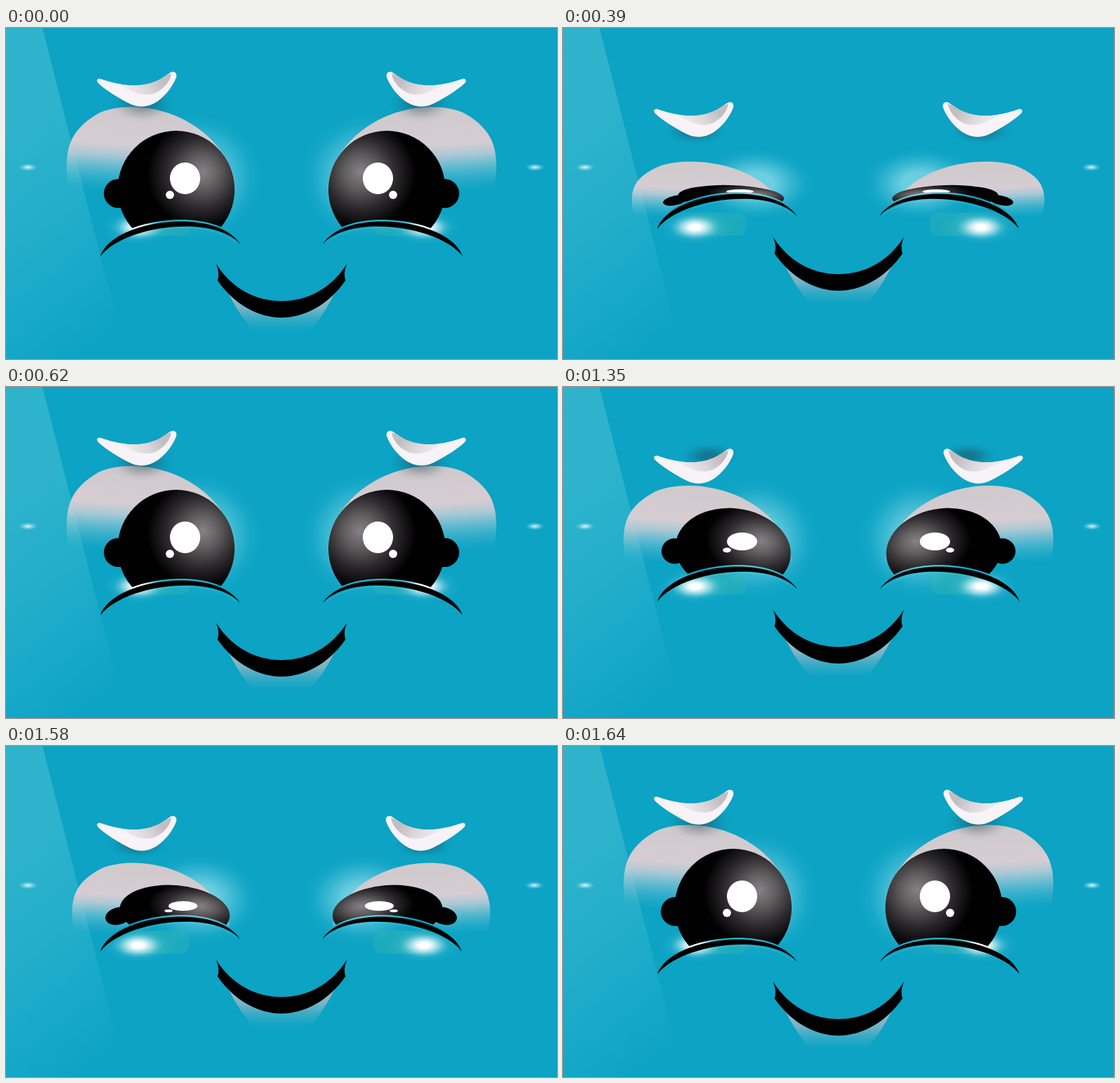
Write an HTML page with a canvas that moves like this. It is 800 by 480 pixels and loops after 2270 ms.

```html
<!DOCTYPE html>
<html lang="en">
<head>
<meta charset="utf-8">
<title>Blinking face</title>
<style>
html, body { margin: 0; width: 100%; height: 100%; overflow: hidden; background: #0ca3c4; }
canvas { display: block; width: 800px; height: 480px; }
</style>
</head>
<body>
<canvas id="c" width="800" height="480"></canvas>
<script>
const ctx = document.getElementById('c').getContext('2d');
const LOOP = 2270;

// eye, ear, shine, spot: [x, y, rx, ry]; white: [left, top, right, height]
const OPEN = {
  brow: 0, lid: 0, mouth: 0, skew: 0, tilt: 0, earTilt: 0,
  white: [88, 115, 334, 120], eye: [247, 234, 85, 85], ear: [163, 240, 21, 21],
  shine: [260, 218, 22, 23], spot: [238, 242, 6, 6],
  glow: [280, 216, 92, 92], shade: [198, 110, 48, 27, 0.42]
};
const HALF = {
  brow: 26, lid: -20, mouth: -19, skew: 0, tilt: 0.12, earTilt: 0,
  white: [88, 143.5, 333, 110], eye: [247, 237, 84, 61], ear: [162, 238, 19, 18.5],
  shine: [260, 224, 22, 13], spot: [238, 236.5, 6, 3.5],
  glow: [280, 220, 92, 88], shade: [212, 100, 44, 20, 0.42]
};
const LOW = {
  brow: 38, lid: -33, mouth: -32, skew: -1, tilt: 0.08, earTilt: -0.25,
  white: [96, 170, 326, 100], eye: [245, 241, 80, 39], ear: [163, 246.5, 19, 12.5],
  shine: [257, 232, 21, 7], spot: [236, 239, 6, 2],
  glow: [280, 222, 88, 66], shade: [192, 144, 46, 19, 0.42]
};
const SHUT = {
  brow: 44, lid: -40, mouth: -39, skew: -1, tilt: 0.03, earTilt: -0.2,
  white: [100, 194, 322, 78], eye: [244, 245, 77, 17], ear: [163, 250, 18, 7],
  shine: [257, 237, 20, 3], spot: [236, 241, 5, 1],
  glow: [280, 226, 84, 52], shade: [192, 150, 46, 19, 0.42]
};

function poseAt(t) {
  for (const start of [330, 1350]) {
    const d = t - start;
    if (d < 0 || d >= 290) continue;
    if (d < 30 || d >= 260) return HALF;
    if (d < 60 || d >= 230) return LOW;
    return SHUT;
  }
  return OPEN;
}

function fill(path, style) {
  ctx.fillStyle = style;
  ctx.fill(path);
}

function ellipse([x, y, rx, ry], style, turn = 0) {
  ctx.beginPath();
  ctx.ellipse(x, y, rx, ry, turn, 0, 7);
  ctx.fillStyle = style;
  ctx.fill();
}

function ramp(x0, y0, x1, y1, ...stops) {
  const g = ctx.createLinearGradient(x0, y0, x1, y1);
  stops.forEach(([at, color]) => g.addColorStop(at, color));
  return g;
}

function blur(x, y, rx, ry, rgb, alpha, core = 0) {
  ctx.save();
  ctx.translate(x, y);
  ctx.scale(rx, ry);
  const g = ctx.createRadialGradient(0, 0, 0, 0, 0, 1);
  const step = (at, a) => g.addColorStop(at, `rgba(${rgb},${a * alpha})`);
  step(0, 1);
  step(core, 1);
  step(core + (1 - core) * 0.45, 0.42);
  step(core + (1 - core) * 0.75, 0.1);
  step(1, 0);
  ellipse([0, 0, 1, 1], g);
  ctx.restore();
}

const lidShape = new Path2D('M137 331C155 277 305 259 340 313C300 269 170 287 137 331Z');
const lidEdge = new Path2D('M190 301C235 285 300 284 334 311');
const aboveLid = new Path2D('M0 -200H400V313H340C305 259 155 277 137 331H0Z');
const browShape = new Path2D(
  'M138 74C165 83 184 85 202 82C219 79 228 72 238 65C245 61 249 66 247 72' +
  'C242 85 231 99 219 107C205 116 190 116 176 108C161 100 146 91 135 81C130 77 132 72 138 74Z');
const browInner = new Path2D(
  'M163 81C185 86 207 83 224 74Q234 67 240 66C239 76 230 88 217 94C198 101 184 93 163 81Z');
const mouthShape = new Path2D(
  'M305 342C328 378 363 396 400 396S472 378 495 342Q489 356 493 366' +
  'C468 402 432 420 400 420S332 402 307 366Q311 356 305 342Z');
const lipShape = new Path2D(
  'M323 385C345 409 374 419 400 419S455 409 477 385C468 402 458 419 447 432' +
  'Q442 438 435 438H365Q358 438 353 432C342 419 332 402 323 385Z');

function drawWhite([l, top, r, h]) {
  const w = r - l, x = u => l + u * w, y = v => top + v * h;
  const p = new Path2D();
  p.moveTo(x(0.012), y(1));
  p.bezierCurveTo(x(-0.025), y(0.5), x(0.02), y(0.27), x(0.19), y(0.07));
  p.bezierCurveTo(x(0.38), y(-0.1), x(0.73), y(0.01), x(0.91), y(0.53));
  p.quadraticCurveTo(x(0.99), y(0.74), x(1), y(1));
  p.closePath();
  fill(p, ramp(0, top, -h * 0.06, top + h,
    [0, '#d0cacd'], [0.36, '#d6cdd2'], [0.5, 'rgba(205,208,216,.82)'],
    [0.68, 'rgba(165,206,218,.45)'], [0.85, 'rgba(120,195,214,.15)'], [1, 'rgba(12,163,196,0)']));
}

function drawEye(p) {
  const [x, y, rx, ry] = p.eye;
  ellipse(p.ear, '#020102', p.earTilt);
  ctx.save();
  ctx.translate(x, y);
  ctx.rotate(p.tilt);
  ctx.scale(rx, ry);
  const g = ctx.createRadialGradient(0.46, -0.3, 0, 0.43, -0.26, 0.92);
  g.addColorStop(0, '#858184');
  g.addColorStop(0.3, '#615e60');
  g.addColorStop(0.65, '#2b292b');
  g.addColorStop(1, '#020102');
  ellipse([0, 0, 1, 1], g);
  ctx.restore();
  ellipse(p.shine, '#fff');
  ellipse(p.spot, '#fff');
}

function drawCheek() {
  ctx.beginPath();
  ctx.roundRect(160, 268, 106, 33, 12);
  ctx.fillStyle = ramp(160, 0, 266, 0,
    [0, 'rgba(60,185,175,0)'], [0.5, 'rgba(60,185,175,.4)'], [1, 'rgba(60,185,175,.3)']);
  ctx.fill();
  blur(192, 289, 52, 25, '190,238,248', 0.65);
  blur(192, 289, 35, 18, '255,255,255', 1, 0.2);
}

function drawSide(p) {
  blur(...p.glow, '150,225,238', 0.7, 0.3);
  drawCheek();

  ctx.save();
  ctx.translate(0, p.lid - 2.5);
  ctx.clip(aboveLid);
  ctx.translate(0, 2.5 - p.lid);
  drawWhite(p.white);
  drawEye(p);
  ctx.restore();

  ctx.save();
  ctx.translate(0, p.lid);
  ctx.strokeStyle = 'rgba(110,210,230,.35)';
  ctx.stroke(lidEdge);
  fill(lidShape, '#000');
  ctx.restore();

  const [sx, sy, sw, sh, sa] = p.shade;
  blur(sx, sy, sw, sh, '30,60,70', sa, 0.2);
  ctx.save();
  ctx.translate(0, p.brow);
  fill(browShape, '#f7f3f6');
  fill(browInner, ramp(180, 96, 222, 70, [0, '#eeeaed'], [0.5, '#dcd8db'], [1, '#c2bdc0']));
  ctx.restore();

  blur(32, 202, 15, 6, '235,250,255', 0.85, 0.05);
}

function drawBand() {
  ctx.beginPath();
  ctx.moveTo(0, 0);
  ctx.lineTo(53, 0);
  ctx.lineTo(175, 480);
  ctx.lineTo(0, 480);
  ctx.fillStyle = ramp(0, 150, 198, 414,
    [0, 'rgba(100,205,215,.39)'], [0.4, 'rgba(90,200,218,.3)'],
    [0.75, 'rgba(80,195,220,.16)'], [1, 'rgba(80,195,220,0)']);
  ctx.fill();
}

function drawMouth(dy) {
  ctx.save();
  ctx.translate(0, dy);
  fill(lipShape, ramp(0, 385, 0, 439,
    [0, 'rgba(200,190,195,.85)'], [0.4, 'rgba(180,190,198,.62)'], [1, 'rgba(70,175,200,.08)']));
  fill(mouthShape, '#000');
  ctx.restore();
}

function draw() {
  const p = poseAt(performance.now() % LOOP);
  ctx.fillStyle = '#0ca3c4';
  ctx.fillRect(0, 0, 800, 480);
  drawBand();
  drawSide(p);
  ctx.save();
  ctx.translate(800 + p.skew, 0);
  ctx.scale(-1, 1);
  drawSide(p);
  ctx.restore();
  drawMouth(p.mouth);
  requestAnimationFrame(draw);
}
draw();
</script>
</body>
</html>
```
